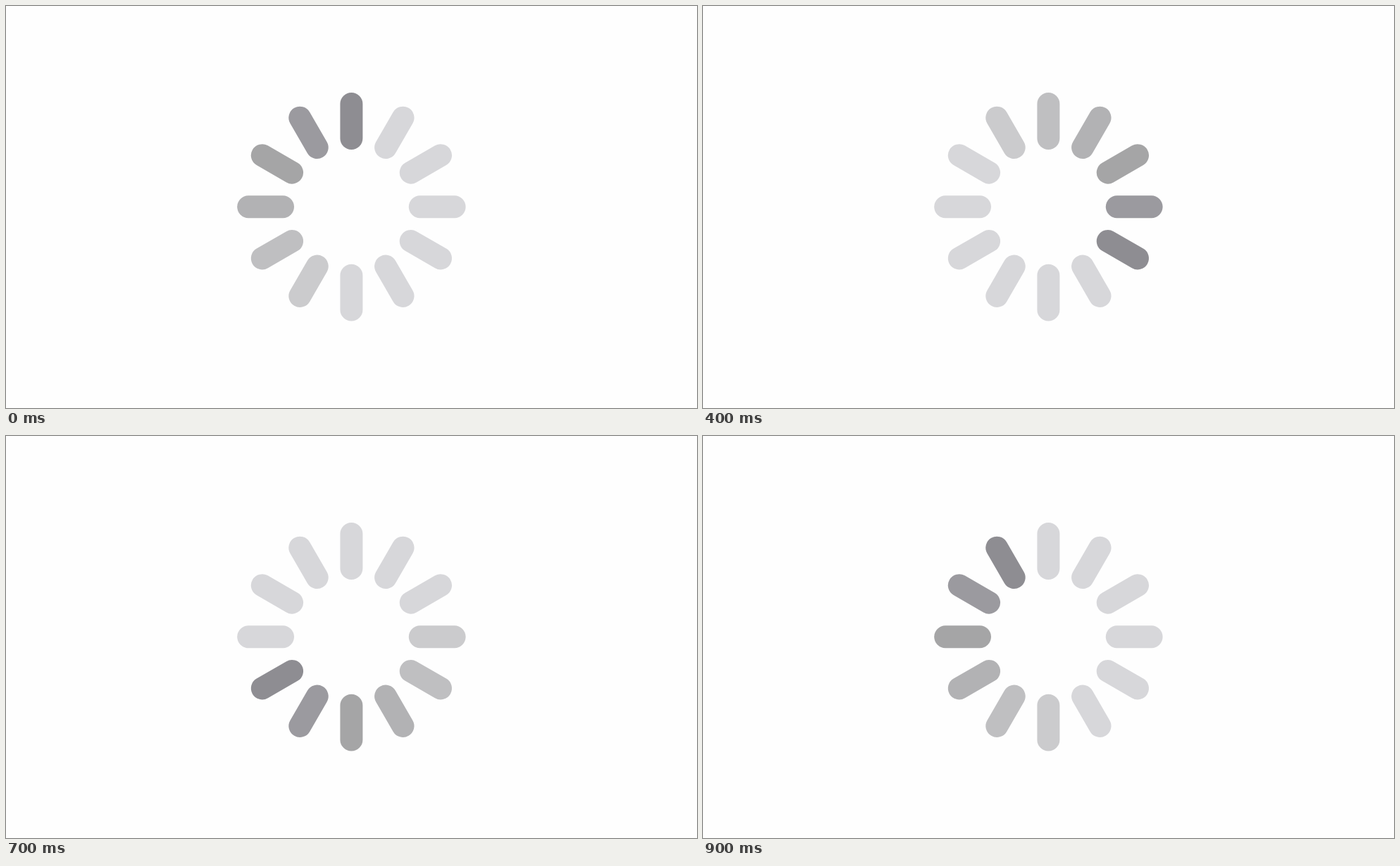
Write an HTML page that moves like this. It is 981 px wide and 571 px high and loops after 950 ms.

```html
<!DOCTYPE html>
<html lang="en">
<head>
<meta charset="utf-8">
<title>Spinner</title>
<style>
  html, body { margin: 0; width: 100%; height: 100%; overflow: hidden; background: #fefefe; }
  svg { display: block; width: 100%; height: 100%; }
</style>
</head>
<body>
<svg viewBox="0 0 981 571">
  <g id="spokes" transform="translate(490.4 285.3)" stroke-width="32" stroke-linecap="round"></g>
</svg>
<script>
const LOOP = 950;
const COUNT = 12;
// Times at which the dark spoke moves on by one
const steps = [150, 200, 300, 400, 450, 500, 600, 700, 750, 850, 900];
// Dark head, fading tail; all other spokes take the last shade
const shades = ['#8e8d92', '#9b9a9f', '#a5a5a6', '#b2b2b4', '#bfbfc1', '#cbcbcd', '#d7d7da'];

const group = document.getElementById('spokes');
const spokes = Array.from({ length: COUNT }, (_, i) => {
  const line = document.createElementNS('http://www.w3.org/2000/svg', 'line');
  line.setAttribute('y1', -97.4);
  line.setAttribute('y2', -146.2);
  line.setAttribute('transform', `rotate(${i * 360 / COUNT})`);
  group.appendChild(line);
  return line;
});

function draw(t) {
  const head = steps.filter(s => s <= t).length;
  spokes.forEach((spoke, i) => {
    const age = (head - i + COUNT) % COUNT;
    spoke.setAttribute('stroke', shades[Math.min(age, shades.length - 1)]);
  });
}

const start = performance.now();
function tick() {
  draw((performance.now() - start) % LOOP);
  requestAnimationFrame(tick);
}
draw(0);
requestAnimationFrame(tick);
</script>
</body>
</html>
```
